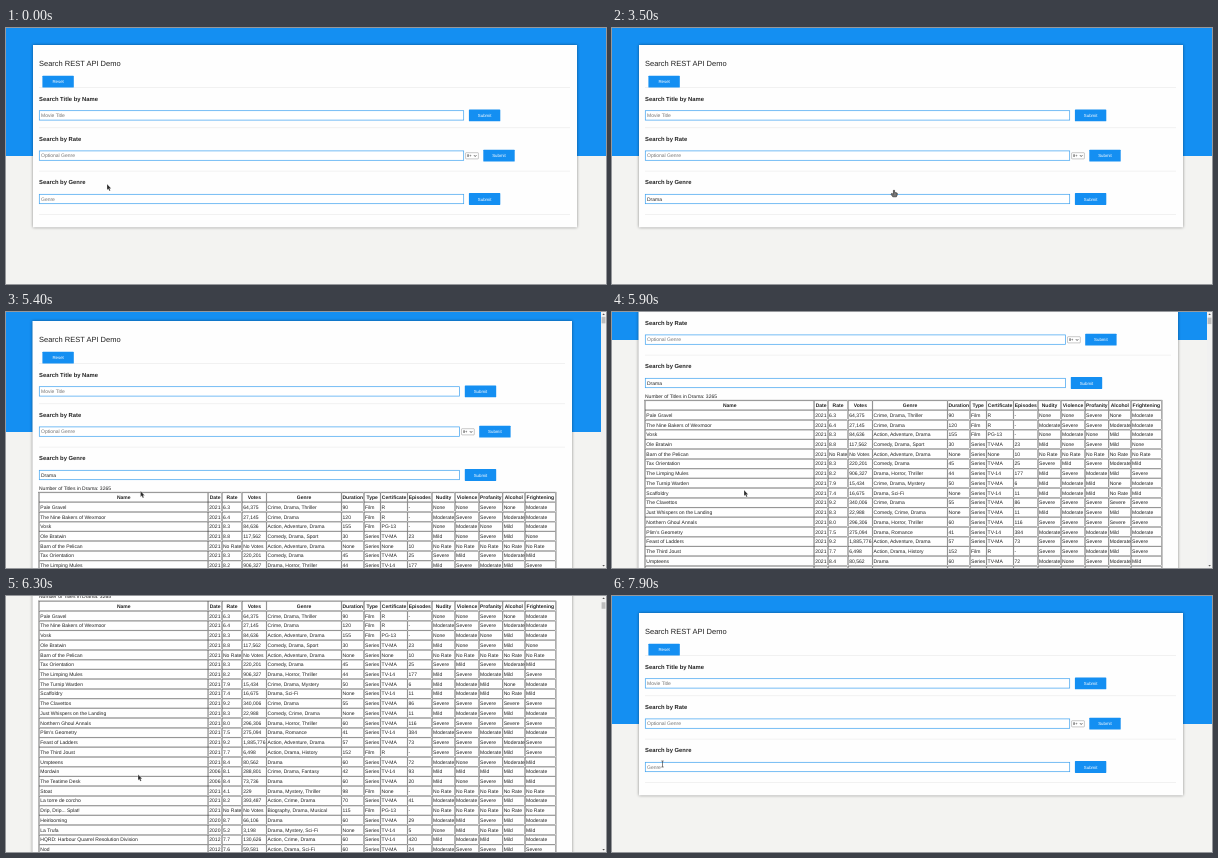
An HTML page for the animation above (8 s loop, 600x256 px).

```html
<!DOCTYPE html>
<html lang="en">
<head>
<meta charset="utf-8">
<title>Search REST API Demo</title>
<style>
html, body { margin: 0; width: 100%; height: 100%; overflow: hidden; background: #f3f3f1; }
svg { display: block; width: 600px; height: 256px; }
text { font: 5px "Liberation Sans", Arial, sans-serif; fill: #222; text-rendering: geometricPrecision; }
.title { font-size: 7.5px; }
.h3 { font-size: 5.85px; font-weight: bold; }
.th { font-weight: bold; text-anchor: middle; }
.btn { font-size: 4.375px; fill: #fff; text-anchor: middle; }
.hint { fill: #757575; }
.tiny { font-size: 4px; }
.blue { fill: #148ff2; }
.card { fill: #fefefe; filter: drop-shadow(0 .5px 1.5px rgba(0,0,0,.45)); }
.field { fill: #fff; stroke: #3ca1f0; stroke-width: .7; }
.focus .field.genre { stroke: #0b6fc4; stroke-width: .9; }
.rule { fill: #e9e9e9; }
.cell { fill: none; stroke: #444; stroke-width: .38; }
.menu { fill: #fff; stroke: #c4c4c4; stroke-width: .4; filter: drop-shadow(0 .4px .6px rgba(0,0,0,.3)); }
</style>
</head>
<body>
<svg id="stage" viewBox="0 0 600 256"></svg>
<script>
const LOOP = 8000, STEP = 100;
const ROW = 9.73, TABLE_TOP = 188.7;

// Left edges of the columns, then the right edge of the table.
const EDGES = [33.2, 202.2, 215.9, 236.1, 260.5, 335.5, 358, 374.5, 401.5, 426, 449, 473, 496.6, 519, 549.7];
const HEADS = 'Name Date Rate Votes Genre Duration Type Certificate Episodes Nudity Violence Profanity Alcohol Frightening'.split(' ');
const LEVELS = { n: 'None', i: 'Mild', m: 'Moderate', s: 'Severe', x: 'No Rate' };

// name | year | rate | votes | genre | minutes | certificate | episodes ("-" for a film) | levels
const ROWS = `Pale Gravel|2021|6.3|64,375|Crime, Drama, Thriller|90|R|-|nnsnm
The Nine Bakers of Wexmoor|2021|6.4|27,145|Crime, Drama|120|R|-|mssmm
Vosk|2021|8.3|84,636|Action, Adventure, Drama|155|PG-13|-|nmnim
Ole Bratwin|2021|8.8|117,562|Comedy, Drama, Sport|30|TV-MA|23|insin
Barn of the Pelican|2021|No Rate|No Votes|Action, Adventure, Drama|None|None|10|xxxxx
Tax Orientation|2021|8.3|220,201|Comedy, Drama|45|TV-MA|25|sismi
The Limping Mules|2021|8.2|906,327|Drama, Horror, Thriller|44|TV-14|177|ismis
The Turnip Warden|2021|7.9|15,434|Crime, Drama, Mystery|50|TV-MA|6|iminm
Scaffoldry|2021|7.4|16,675|Drama, Sci-Fi|None|TV-14|11|imixi
The Clavettos|2021|9.2|340,006|Crime, Drama|55|TV-MA|86|sssss
Just Whispers on the Landing|2021|8.3|22,988|Comedy, Crime, Drama|None|TV-MA|11|imsim
Northern Ghoul Annals|2021|8.0|296,306|Drama, Horror, Thriller|60|TV-MA|116|sssss
Plim's Geometry|2021|7.5|275,094|Drama, Romance|41|TV-14|384|msmim
Feast of Ladders|2021|9.2|1,885,776|Action, Adventure, Drama|57|TV-MA|73|sssms
The Third Joust|2021|7.7|6,498|Action, Drama, History|152|R|-|ssmis
Umpteens|2021|8.4|80,562|Drama|60|TV-MA|72|mnsmi
Mordwin|2006|8.1|288,801|Crime, Drama, Fantasy|42|TV-14|93|iiiim
The Teatime Desk|2006|8.4|73,736|Drama|60|TV-MA|20|insii
Stoat|2021|4.1|229|Drama, Mystery, Thriller|98|None|-|xxxxx
La torre de corcho|2021|8.2|393,487|Action, Crime, Drama|70|TV-MA|41|mmsim
Drip, Drip... Splat!|2021|No Rate|No Votes|Biography, Drama, Musical|115|PG-13|-|xxxxx
Heirlooming|2020|8.7|66,106|Drama|60|TV-MA|29|misim
La Trufa|2020|5.2|3,198|Drama, Mystery, Sci-Fi|None|TV-14|5|nixii
HQRD: Harbour Quarrel Resolution Division|2012|7.7|130,626|Action, Crime, Drama|60|TV-14|420|imiim
Nod|2012|7.6|59,581|Action, Drama, Sci-Fi|60|TV-MA|24|mssis`.split('\n');

const GENRES = ['Drama', 'Documentary', 'Dance', 'Comedy', 'Action', 'Horror'];

// Typed text and number of suggestions from each time on.
const TYPING = [[0, '', 0], [700, '', 6], [900, 'D', 3], [1100, 'Dr', 1], [1300, 'Dra', 1],
  [1400, 'Dram', 1], [1500, 'Drama', 1], [1600, 'Drama', 0], [7700, '', 0]];

const SCROLL = [[0, 0], [5300, 0], [5400, 8], [5700, 76], [5800, 76], [5900, 100], [6300, 183.2],
  [6400, 183.2], [6800, 52.4], [6900, 22], [7000, 0]];

const POINTER = [[0, 101, 156, 'arrow'], [300, 89, 168, 'beam'], [400, 89, 168, 'beam'],
  [700, 99.5, 171, 'beam'], [900, 99.5, 171, ''], [1800, 130, 171, 'beam'], [2400, 440, 172, 'beam'],
  [2500, 465, 172, 'hand'], [2600, 469, 171, 'hand'], [2700, 470, 171.5, 'hand'], [3000, 470, 171.5, 'hand'],
  [3100, 484, 153, 'arrow'], [3200, 380, 153, 'arrow'], [3300, 282, 162, 'arrow'], [3400, 282, 162, 'arrow'],
  [3500, 282, 162, 'hand'], [4900, 282, 162, 'hand'], [5000, 262, 165, 'arrow'], [5300, 140, 180, 'arrow'],
  [5400, 134.5, 179, 'arrow'], [5900, 132, 178, 'arrow'], [6400, 132, 178.5, 'arrow'],
  [6800, 121.5, 165, 'arrow'], [7300, 50, 51, 'hand'], [7700, 50, 52, 'arrow'],
  [7800, 50, 112, 'arrow'], [7900, 50.5, 168, 'beam']];

const text = (x, y, s, cls = '') => `<text x="${x}" y="${y}" class="${cls}">${s}</text>`;
const rect = (x, y, w, h, cls, more = '') =>
  `<rect x="${x}" y="${y}" width="${w}" height="${h}" class="${cls}" ${more}/>`;
const button = (x, y, label) =>
  rect(x, y, 31.4, 11.8, 'blue', 'rx=".6"') + text(x + 15.7, y + 7.4, label, 'btn');

// The form; narrow is the width taken away by the scrollbar.
function form(narrow, height) {
  const right = 458 - narrow * .82;
  const rule = y => rect(33, y, 531 - narrow, .6, 'rule');
  const row = (y, heading, hint, gap, cls) =>
    text(33, y, heading, 'h3') +
    rect(33.3, y + 9.9, right - 33.6, 9.4, 'field ' + cls) +
    text(35, y + 16.4, hint, 'hint ' + cls) +
    button(right + gap, y + 8.7, 'Submit');
  return rect(0, 0, 600, 128, 'blue') +
    rect(27 - narrow * .1, 17, 544 - narrow * .9, height, 'card') +
    text(33, 38.1, 'Search REST API Demo', 'title') +
    rule(59.2) + button(36.4, 47.7, 'Reset') +
    row(72.8, 'Search Title by Name', 'Movie Title', 4.9, '') + rule(99.5) +
    row(113, 'Search by Rate', 'Optional Genre', 19.3, '') + rule(142.8) +
    rect(right + 1.6, 124.7, 12.8, 6.2, '', 'rx=".6" fill="#fff" stroke="#777" stroke-width=".4"') +
    text(right + 3, 129.3, '8+', 'tiny') +
    `<path d="M${right + 10} 127.2l1.2 1.3 1.2-1.3" fill="none" stroke="#222" stroke-width=".7"/>` +
    row(156.4, 'Search by Genre', 'Genre', 4.9, 'genre');
}

function table() {
  const cells = (values, n) => values.map((value, i) => {
    const x = EDGES[i], w = EDGES[i + 1] - x, y = TABLE_TOP - 0.2 + n * ROW;
    const label = n ? text(x + 1.1, y + 6.6, value) : text(x + w / 2, y + 6.6, value, 'th');
    return rect(x + .35, y + .35, w - .7, ROW - .7, 'cell') + label;
  }).join('');
  const rows = ROWS.map((line, i) => {
    const v = line.split('|'), levels = [...v.pop()].map(c => LEVELS[c]);
    v.splice(6, 0, v[7] === '-' ? 'Film' : 'Series');
    return cells([...v, ...levels], i + 1);
  });
  return text(33, 185.5, 'Number of Titles in Drama: 3265') +
    rect(32.8, TABLE_TOP - .6, 517.3, ROW * 26 + .8, 'cell') +
    cells(HEADS, 0) + rows.join('');
}

const scrollbar = rect(595, 0, 5, 256, '', 'fill="#f1f1f1"') +
  '<path d="M596.3 3l1.3-1.5 1.3 1.5zM596.3 253l1.3 1.5 1.3-1.5z" fill="#555"/>' +
  rect(595.6, 4.8, 3.9, 6.5, '', 'id="thumb" fill="#bdbdbd"');

const stage = document.getElementById('stage');
stage.innerHTML = `
  <g id="home">${form(0, 182.3)}${rect(33, 186.2, 531, .6, 'rule')}</g>
  <g id="results"><g id="page">${form(5, 600)}${table()}</g>${scrollbar}</g>
  <g id="menu"><rect class="menu" x="34" y="177" width="58.5"/>
    ${GENRES.map((g, i) => text(36.5, 187 + i * 11.4, g)).join('')}</g>
  <g id="pointer">
    <path id="arrow" d="M0 0V5.9L1.3 4.8 2.3 6.9 3.4 6.4 2.5 4.4H4.2Z" fill="#2b2b2b" stroke="#fff" stroke-width=".25"/>
    <path id="hand" d="M-.6.4Q0-.4.6.4V2.4L3.2 3V5L2.4 6.8H-1.2L-3 4.2-2.4 3.4-.6 4.2Z" fill="#777" stroke="#222" stroke-width=".6"/>
    <path id="beam" d="M-1.2-3H1.2M0-3V3M-1.2 3H1.2" stroke="#333" stroke-width=".6"/>
  </g>`;

const el = id => document.getElementById(id);
const show = (node, on) => node.setAttribute('visibility', on ? 'inherit' : 'hidden');
const lastAt = (keys, t) => keys.filter(k => k[0] <= t).pop();

function between(keys, t, col) {
  const a = lastAt(keys, t), b = keys[keys.indexOf(a) + 1];
  return b ? a[col] + (b[col] - a[col]) * (t - a[0]) / (b[0] - a[0]) : a[col];
}

const menuBox = stage.querySelector('.menu');
const menuItems = stage.querySelectorAll('#menu text');
const genreTexts = stage.querySelectorAll('text.genre');

function draw(t) {
  const [, typed, count] = lastAt(TYPING, t);
  const found = t >= 4500 && t < 7700;
  show(el('home'), !found);
  show(el('results'), found);
  el('home').classList.toggle('focus', t >= 600 && t < 2600);

  genreTexts.forEach(node => {
    node.textContent = typed || 'Genre';
    node.classList.toggle('hint', !typed);
  });
  show(el('menu'), count > 0);
  menuBox.setAttribute('height', 5 + count * 11.4);
  menuItems.forEach((node, i) => show(node, i < count));

  const scroll = between(SCROLL, t, 1);
  el('page').setAttribute('transform', `translate(0 ${-scroll})`);
  el('thumb').setAttribute('y', 4.8 + scroll * .008);

  const shape = lastAt(POINTER, t)[3];
  for (const id of ['arrow', 'hand', 'beam']) show(el(id), id === shape);
  el('pointer').setAttribute('transform',
    `translate(${between(POINTER, t, 1)} ${between(POINTER, t, 2)})`);
}

const start = performance.now();
function tick() {
  const t = (performance.now() - start) % LOOP;
  draw(Math.floor(t / STEP) * STEP);
  requestAnimationFrame(tick);
}
draw(0);
requestAnimationFrame(tick);
</script>
</body>
</html>
```
